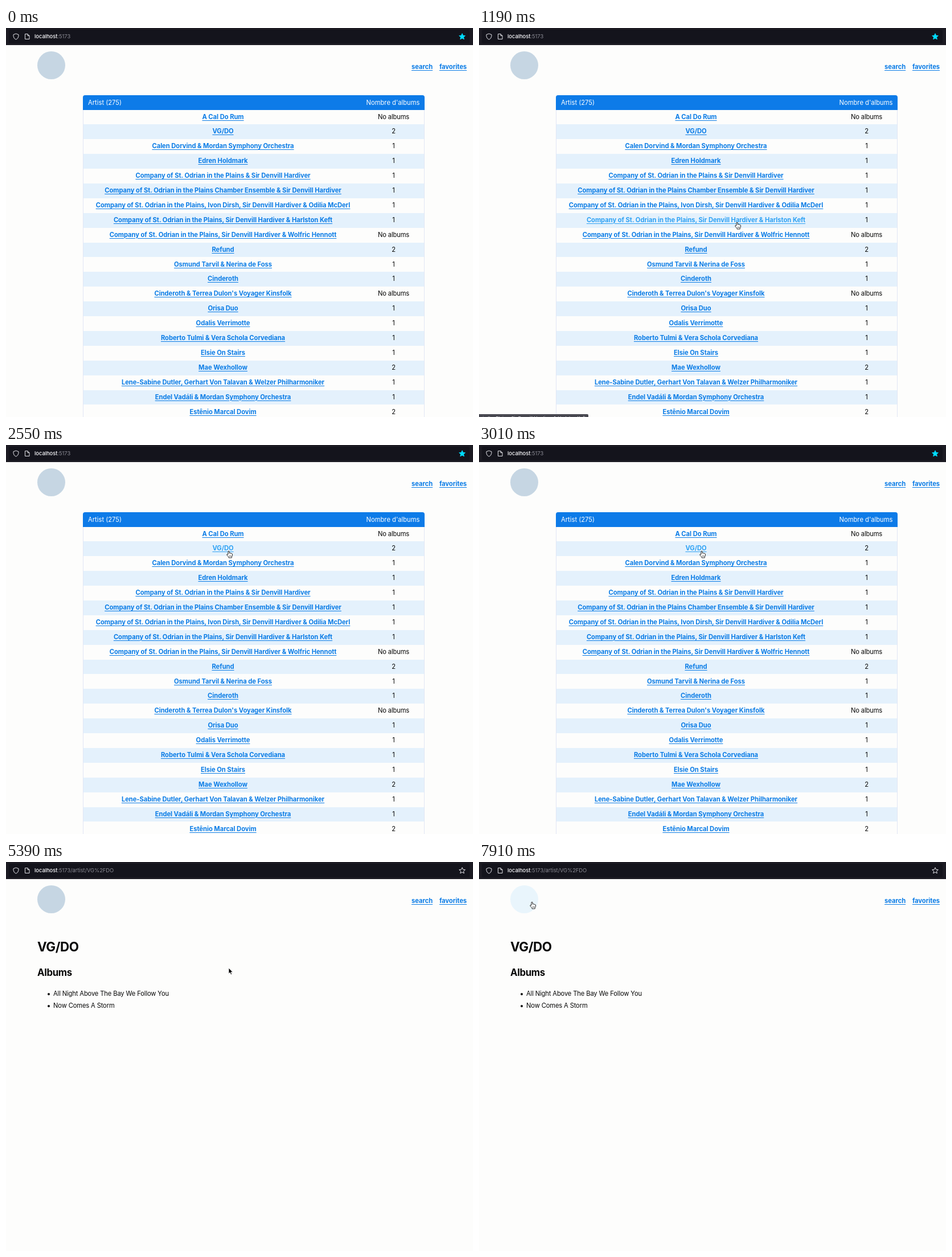
Recreate the animation shown at these times as an HTML page. Size 820x683 px, loop 8 s.

```html
<!DOCTYPE html>
<html lang="en">
<head>
<meta charset="utf-8">
<title>Artists</title>
<style>
  html, body { margin: 0; width: 100%; height: 100%; overflow: hidden; }
  body { background: #fdfdfc; color: #080808; font: 400 11.2px Inter, "Liberation Sans", sans-serif; letter-spacing: -.14px; }
  #stage { position: absolute; left: 0; top: 0; width: 820px; height: 683px; overflow: hidden; }
  #stage div, #stage svg, nav a { position: absolute; white-space: nowrap; }
  #stage svg, #list, #artist { left: 0; top: 0; }
  a { color: #0a7ce6; font-weight: 700; letter-spacing: -.04px; text-decoration: underline 1px; text-underline-offset: 1.5px; }
  a.hot { color: #2fa2f4; }
  #bar { left: 0; top: 0; width: 820px; height: 30px; background: #1c1b23; }
  #field { left: 5px; top: 3px; width: 809px; height: 24px; border-radius: 3px; background: #14141c; }
  #url { left: 50px; top: 5px; line-height: 20px; font-size: 9.4px; letter-spacing: -.04px; color: #8b8b94; }
  #url b { font-weight: 500; color: #fbfbfe; }
  #logo { left: 55px; top: 41px; width: 49px; height: 49px; border-radius: 50%; }
  nav a { top: 58px; line-height: 20px; }
  #table { left: 135px; top: 117.5px; width: 598px; height: 570px; border: solid #e1e6f5; border-width: 0 1px; border-radius: 4px 4px 0 0; }
  .row { left: 0; width: 598px; height: 25.9px; line-height: 25.9px; text-align: center; }
  .row.even { background: #e4f1fc; }
  #table .head { left: -1px; top: 0; width: 600px; height: 26px; line-height: 26px; border-radius: 4px 4px 0 0; background: #0d7be8; color: #fff; letter-spacing: 0; }
  .name { left: 0; top: 0; width: 490px; }
  .count { left: 490px; top: 0; width: 109px; }
  .head .name { left: 9px; text-align: left; }
  #artist div { line-height: 30px; }
  .big { font-weight: 700; letter-spacing: -.02em; }
  .dot { width: 4.4px; height: 4.4px; border-radius: 50%; background: #080808; }
  #status { left: -82px; top: 678px; height: 14px; line-height: 14px; padding-right: 5px; border-radius: 0 2px 0 0; background: #484850; color: #fbfbfe; font-size: 8px; letter-spacing: 0; }
  #cursor { overflow: visible; }
</style>
</head>
<body>
<div id="stage">
  <div id="list">
    <div id="table">
      <div class="row head"><div class="name">Artist (275)</div><div class="count">Nombre d'albums</div></div>
    </div>
  </div>
  <div id="artist">
    <div class="big" style="left:55px;top:134px;font-size:22.4px">VG/DO</div>
    <div class="big" style="left:55px;top:179px;font-size:16.8px">Albums</div>
    <div class="dot" style="left:73px;top:230px"></div>
    <div style="left:83px;top:216px">All Night Above The Bay We Follow You</div>
    <div class="dot" style="left:73px;top:251px"></div>
    <div style="left:83px;top:237px">Now Comes A Storm</div>
  </div>
  <div id="logo"></div>
  <nav><a style="left:712px">search</a><a style="right:11px">favorites</a></nav>
  <div id="bar">
    <div id="field"></div>
    <svg width="820" height="29" fill="none" stroke="#e4e4ea" stroke-linejoin="round">
      <path d="M17.5 10 L22 11.6 V14.5 Q21.5 18.5 17.5 20.3 Q13.5 18.5 13 14.5 V11.6 Z"/>
      <path d="M33.5 10.5 H38 L41 13.5 V19.5 H33.5 Z M38 10.5 V13.5 H41"/>
      <path id="star" d=""/>
    </svg>
    <div id="url"><b>localhost</b>:5173<span id="path"></span></div>
  </div>
  <div id="status"></div>
  <svg id="cursor" width="1" height="1" stroke-linejoin="round">
    <path id="arrow" d="M0 0 V10.2 L2.3 8.1 L3.9 11.7 L5.6 10.9 L4.1 7.4 H7.2 Z" fill="#000" stroke="#fff" stroke-width=".8"/>
    <g id="hand" fill="#fff" stroke="#111" stroke-width=".9">
      <path d="M-1 6 V.9 Q0 -.7 1.2 .9 V4 Q2.2 3.2 3.1 4.2 Q4.2 3.6 4.9 4.7 Q6.2 4.3 6.5 5.7 V8.3 L5.3 10.5 V12 H0 V10.7 L-3.2 7 Q-3.3 5.2 -1.9 5.7 Z"/>
      <path d="M1.3 8 V10 M2.9 8 V10 M4.3 8 V10" stroke-width=".6"/>
    </g>
  </svg>
</div>
<script>
const LOOP = 8000, ROW = 25.9, TOP = 143.5, MID = 380.5;
const URL_AT = 3500, ARROW_AT = 3600, PAGE_AT = 5390;
const $ = id => document.getElementById(id);

const company = "Company of St. Odrian in the Plains";
const sir = "Sir Denvill Hardiver";
const artists = [
  "A Cal Do Rum",
  "VG/DO",
  "Calen Dorvind & Mordan Symphony Orchestra",
  "Edren Holdmark",
  `${company} & ${sir}`,
  `${company} Chamber Ensemble & ${sir}`,
  `${company}, Ivon Dirsh, ${sir} & Odilia McDerl`,
  `${company}, ${sir} & Harlston Keft`,
  `${company}, ${sir} & Wolfric Hennott`,
  "Refund",
  "Osmund Tarvil & Nerina de Foss",
  "Cinderoth",
  "Cinderoth & Terrea Dulon's Voyager Kinsfolk",
  "Orisa Duo",
  "Odalis Verrimotte",
  "Roberto Tulmi & Vera Schola Corvediana",
  "Elsie On Stairs",
  "Mae Wexhollow",
  "Lene-Sabine Dutler, Gerhart Von Talavan & Welzer Philharmoniker",
  "Endel Vadáli & Mordan Symphony Orchestra",
  "Estênio Marcal Dovim"
];
const counts = "021111110211011112112";

function add(parent, tag, cls, text = "") {
  const el = document.createElement(tag);
  el.className = cls;
  el.textContent = text;
  return parent.appendChild(el);
}

const links = artists.map((name, i) => {
  const row = add($("table"), "div", i % 2 ? "row even" : "row");
  row.style.top = 26 + i * ROW + "px";
  const link = add(add(row, "div", "name"), "a", "", name);
  add(row, "div", "count", counts[i] === "0" ? "No albums" : counts[i]);
  return link;
});
const widths = links.map(a => a.getBoundingClientRect().width);

$("star").setAttribute("d", Array.from({ length: 10 }, (_, i) => {
  const r = i % 2 ? 2.6 : 5.6, a = (i / 5 - .5) * Math.PI;
  return (i ? "L" : "M") + (801 + r * Math.cos(a)) + " " + (15.3 + r * Math.sin(a));
}).join("") + "Z");

// time, x, y of the pointer tip
const track = [
  [0, 575, 705], [250, 560, 692], [800, 468, 366], [1190, 453, 341], [1500, 450, 335],
  [1800, 440, 262], [1900, 438, 232], [1990, 420, 226], [2200, 403, 204], [2450, 391, 186],
  [6090, 391, 186], [6450, 275, 128], [6890, 123, 76], [7150, 97, 72], [7630, 93, 70], [LOOP, 93, 70]
];

function tipAt(t) {
  const i = Math.max(1, track.findIndex(p => p[0] > t));
  const [t0, x0, y0] = track[i - 1], [t1, x1, y1] = track[i];
  const k = (t - t0) / (t1 - t0);
  return [x0 + (x1 - x0) * k, y0 + (y1 - y0) * k];
}

function hoverAt(t) {
  if (t < 0 || t >= PAGE_AT) return -1;
  const [x, y] = tipAt(t);
  const i = Math.floor((y - TOP) / ROW);
  const off = Math.abs(y - TOP - (i + .5) * ROW);
  return i >= 0 && i < links.length && off < 6.5 && Math.abs(x - MID) < widths[i] / 2 ? i : -1;
}

// the status line lingers briefly after the pointer leaves a link
function statusAt(t) {
  for (let lag = 0; lag <= 300; lag += 20) {
    const i = hoverAt(t - lag);
    if (i >= 0) return i;
  }
  return -1;
}

const overLogo = t => {
  const [x, y] = tipAt(t);
  return t > PAGE_AT && Math.hypot(x - 79.5, y - 65.5) < 25;
};
const show = (el, on) => { el.style.display = on ? "" : "none"; };

function draw(t) {
  const [x, y] = tipAt(t), hot = hoverAt(t), bar = statusAt(t);
  const page = t >= PAGE_AT, logo = overLogo(t);
  show($("list"), !page);
  show($("artist"), page);
  links.forEach((a, i) => a.classList.toggle("hot", i === hot));

  $("path").textContent = t >= URL_AT ? "/artist/VG%2FDO" : "";
  $("star").setAttribute("fill", page ? "none" : "#00ddff");
  $("star").setAttribute("stroke", page ? "#e4e4ea" : "#00ddff");
  $("logo").style.background = logo ? "#e9f5fc" : "#c6d6e3";

  show($("status"), bar >= 0 && t < URL_AT);
  $("status").textContent = bar >= 0 ? artists[bar] : "";

  const hand = logo || (hot >= 0 && t < ARROW_AT);
  show($("hand"), hand);
  show($("arrow"), !hand);
  $("cursor").style.transform = `translate(${x}px, ${y}px)`;
}

const start = performance.now();
function tick() {
  draw((performance.now() - start) % LOOP);
  requestAnimationFrame(tick);
}
tick();
</script>
</body>
</html>
```
